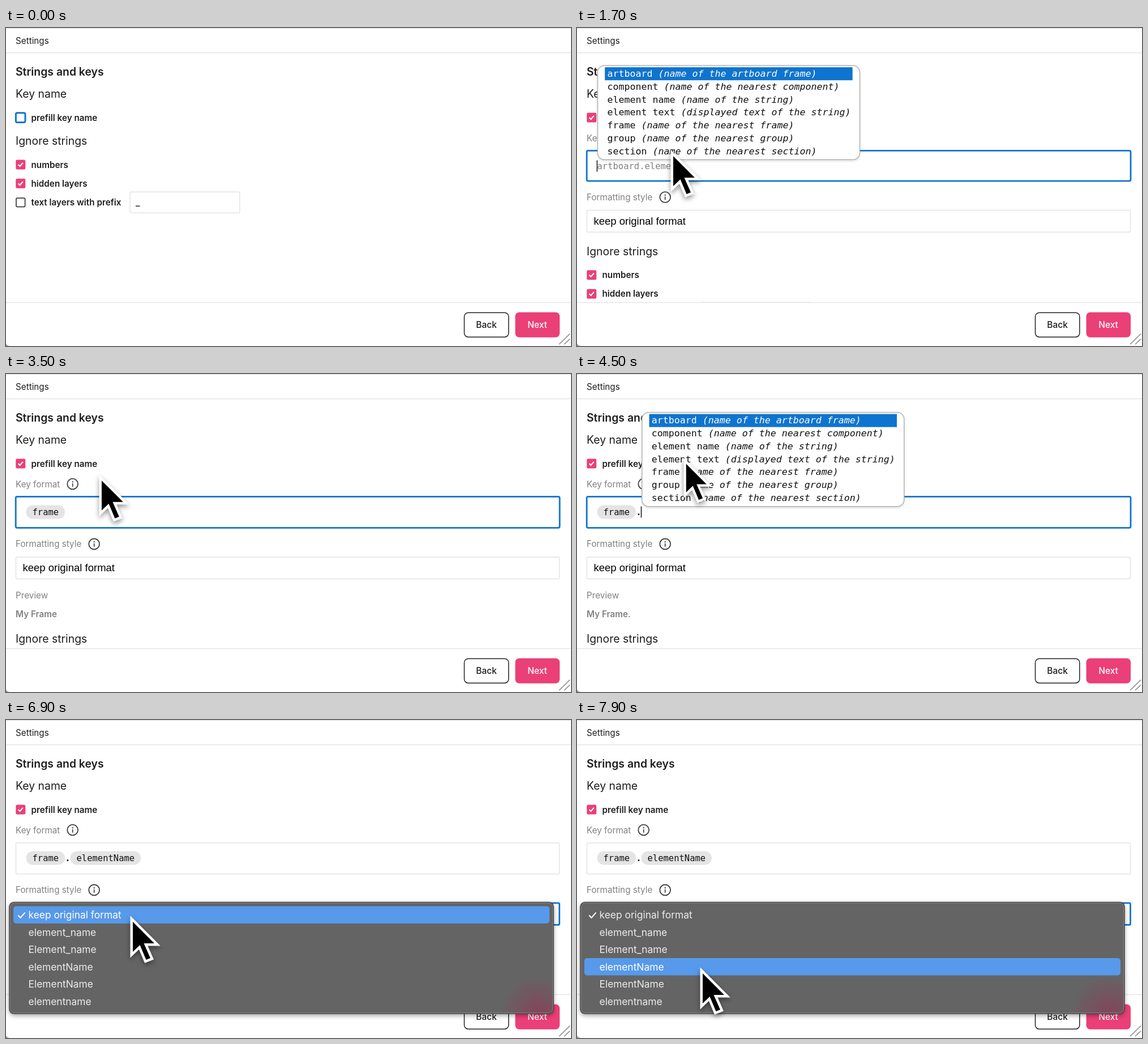
Write an HTML page with a canvas that moves like this. It is 998x561 px and loops after 8000 ms.

```html
<!DOCTYPE html>
<html lang="en">
<head>
<meta charset="utf-8">
<title>Settings</title>
<style>
html, body { margin: 0; width: 100%; height: 100%; overflow: hidden; background: #fff; }
canvas { display: block; width: 998px; height: 561px; }
</style>
</head>
<body>
<canvas id="stage" width="998" height="561"></canvas>
<script>
const ctx = document.getElementById('stage').getContext('2d');
const LOOP = 8000;
const PINK = '#eb3f78', BLUE = '#0f74cf', INK = '#1d1d1d', GREY = '#808080', LINE = '#e4e4e4';
const UI = 'Inter, sans-serif';
const MONO = '"DejaVu Sans Mono", monospace';
const SMALL = `15.25px ${UI}`, BOLD = `600 15.25px ${UI}`, HEAD = `19.4px ${UI}`;
const CODE = `15.5px ${MONO}`;

// Moments at which the state jumps
const AT = { check: 300, arrow: 500, pointer: 1000, focus: 1500, frame: 2900, dot: 4100, element: 5200, menu: 6500 };

const TOKENS = [
  ['artboard', 'name of the artboard frame'],
  ['component', 'name of the nearest component'],
  ['element name', 'name of the string'],
  ['element text', 'displayed text of the string'],
  ['frame', 'name of the nearest frame'],
  ['group', 'name of the nearest group'],
  ['section', 'name of the nearest section']
];
const STYLES = ['keep original format', 'element_name', 'Element_name', 'elementName', 'ElementName', 'elementname'];

// time, x, y, scale
const PATH = [
  [500, 60, 158, 1], [800, 135, 153, 1], [1300, 165, 214, 1], [1700, 165, 214, 1],
  [2450, 162, 182, 0.95], [2700, 162, 182, 0.95], [2950, 164, 176, 0.95], [3600, 164, 176, 1],
  [4350, 188, 147, 0.95], [4600, 188, 147, 0.95], [5050, 185, 135, 0.95], [5300, 185, 135, 1],
  [5850, 185, 135, 1], [6400, 219, 344, 1], [7050, 219, 344, 1], [7700, 217, 435, 1]
];
const POINTER = [[5, 12], [5, 65], [17.5, 53], [28.5, 79], [36, 76], [24.5, 50], [43, 50]];
const ARROW = [[4, 5], [60, 26], [35, 35], [24, 60]];

function label(str, x, y, font = SMALL, color = INK) {
  ctx.font = font;
  ctx.fillStyle = color;
  ctx.fillText(str, x, y);
  return ctx.measureText(str).width;
}

function box(x, y, w, h, r, fill, stroke, width = 1.5) {
  ctx.beginPath();
  ctx.roundRect(x, y, w, h, r);
  if (fill) { ctx.fillStyle = fill; ctx.fill(); }
  if (stroke) { ctx.strokeStyle = stroke; ctx.lineWidth = width; ctx.stroke(); }
}

function line(points, color, width) {
  ctx.beginPath();
  points.forEach(([x, y]) => ctx.lineTo(x, y));
  ctx.strokeStyle = color;
  ctx.lineWidth = width;
  ctx.stroke();
}

function shadow(color, blur, dy) {
  ctx.shadowColor = color;
  ctx.shadowBlur = blur;
  ctx.shadowOffsetY = dy;
}

function tick(x, y, s, color, width) {
  line([[x - 4 * s, y], [x - 1.2 * s, y + 3 * s], [x + 4.2 * s, y - 3.2 * s]], color, width);
}

function checkbox(y, text, on, focus) {
  if (focus && on) box(15.5, y - 10, 20.5, 20, 4, '#fff', BLUE, 1.8);
  if (on) {
    box(17.3, y - 8.5, 17, 17, 2.5, PINK);
    tick(25.7, y, 1, '#fff', 2);
  } else if (focus) {
    box(17.4, y - 8.2, 16.6, 16.6, 2.5, '#fff', BLUE, 3);
  } else {
    box(18, y - 7.5, 15.6, 15.4, 2, '#fff', '#222', 1.5);
  }
  label(text, 44.5, y + 5.5, BOLD);
}

function info(x, y) {
  ctx.beginPath();
  ctx.arc(x, y, 9.4, 0, 7);
  ctx.strokeStyle = '#3d3d3d';
  ctx.lineWidth = 1.8;
  ctx.stroke();
  line([[x, y - 1.2], [x, y + 4.8]], '#3d3d3d', 1.7);
  ctx.fillStyle = '#3d3d3d';
  ctx.fillRect(x - 1, y - 4.8, 2, 2);
}

function chip(text, x) {
  ctx.font = CODE;
  const w = ctx.measureText(text).width + 22;
  box(x, 231.5, w, 24, 12, '#e4e4e4');
  label(text, x + 11, 248.5, CODE, '#111');
  return x + w;
}

function keyField(t) {
  const focus = t >= AT.focus && t < AT.menu;
  const filled = t >= AT.frame;
  const h = filled ? 55 : 53.5;
  label('Key format', 17, 199.5, SMALL, GREY);
  info(117.7, 194);
  if (focus) box(17.2, 216.3, 960.8, h, 2.5, '#fff', BLUE, 2.8);
  else box(17.5, 216.7, 960, h, 2, '#fff', LINE);

  let x = 35.5, since = AT.focus;
  if (!filled) label('artboard.element', 35.5, 248.5, CODE, GREY);
  else { x = chip('frame', x); since = AT.frame; }
  if (t >= AT.dot) { x += label('.', x, 248.5, `bold ${CODE}`, '#111'); since = AT.dot; }
  if (t >= AT.element) { x = chip('elementName', x); since = AT.element; }
  if (focus && (t - since) % 1000 < 500) line([[x, 233.5], [x, 253.5]], '#111', 1.5);
}

function styleField(t) {
  const dy = t >= AT.frame ? 1.4 : 0;
  label('Formatting style', 17, 304 + dy, SMALL, GREY);
  info(155.7, 298.5 + dy);
  const open = t >= AT.menu;
  box(17.5, 321.5 + dy, 960, 38.5, 2, '#fff', open ? BLUE : LINE, open ? 2.8 : 1.5);
  label('keep original format', 29.5, 347 + dy, '18.5px "Liberation Sans", Arial, sans-serif', '#000');
}

function ignoreSection(dy) {
  label('Ignore strings', 17, 206.3 + dy, HEAD);
  checkbox(241 + dy, 'numbers', true);
  checkbox(274.2 + dy, 'hidden layers', true);
  checkbox(307.5 + dy, 'text layers with prefix', false);
  box(219.2, 289.3 + dy, 193.6, 37, 2, '#fff', LINE);
  line([[229, 314.2 + dy], [236.5, 314.2 + dy]], '#222', 1.5);
}

function page(t) {
  const on = t >= AT.check;
  ctx.save();
  ctx.beginPath();
  ctx.rect(0, 44, 998, 440);
  ctx.clip();
  label('Strings and keys', 17, 84.3, `600 19.4px ${UI}`);
  label('Key name', 17, 123.3, HEAD);
  checkbox(158, 'prefill key name', on, t < AT.focus);
  if (on) { keyField(t); styleField(t); }
  if (t >= AT.frame) {
    const value = 'My Frame' + (t >= AT.dot ? '.' : '') + (t >= AT.element ? 'My element' : '');
    label('Preview', 17, 395.5, SMALL, GREY);
    label(value, 17, 429, BOLD, GREY);
  }
  ignoreSection(t >= AT.frame ? 268 : on ? 194.7 : 0);
  ctx.restore();
}

function chrome() {
  ctx.fillStyle = LINE;
  for (const y of [0, 43, 483.7]) ctx.fillRect(0, y, 998, 1.4);
  label('Settings', 17, 27.5);
  box(809.5, 502.2, 78.3, 43, 7, '#fff', '#222', 1.5);
  box(899.5, 501.5, 78.5, 44.3, 7, PINK);
  const font = `500 15.5px ${UI}`;
  ctx.textAlign = 'center';
  label('Back', 848.5, 529, font);
  label('Next', 938.5, 529, font, '#fff');
  ctx.textAlign = 'left';
  line([[977, 558], [996, 539.5]], '#8c8c8c', 1.7);
  line([[986, 558], [996, 548.5]], '#8c8c8c', 1.7);
  ctx.beginPath();
  ctx.moveTo(0, 556);
  ctx.quadraticCurveTo(1, 560, 6, 561);
  ctx.lineTo(0, 561);
  ctx.fillStyle = '#9a9a9a';
  ctx.fill();
}

function popup(x, y) {
  ctx.save();
  shadow('rgba(0,0,0,.16)', 5, 2);
  box(x, y, 463, 166, 12, '#fff');
  ctx.restore();
  box(x, y, 463, 166, 12, null, '#b4b4b4', 1.5);
  ctx.fillStyle = BLUE;
  ctx.fillRect(x + 12.7, y + 2.9, 437.5, 23);
  TOKENS.forEach(([name, note], i) => {
    const color = i ? '#111' : '#fff', ty = y + 19.7 + i * 22.75;
    const w = label(name + ' ', x + 17, ty, `16.63px ${MONO}`, color);
    label(`(${note})`, x + 17 + w, ty, `italic 16.63px ${MONO}`, color);
  });
}

function menu(tipY) {
  ctx.save();
  shadow('rgba(0,0,0,.4)', 9, 3);
  box(6, 321.5, 961, 196.5, 8, '#646464');
  ctx.restore();
  ctx.save();
  ctx.beginPath();
  ctx.roundRect(6, 321.5, 961, 196.5, 8);
  ctx.clip();
  const glow = ctx.createRadialGradient(940, 518, 4, 940, 518, 66);
  glow.addColorStop(0, 'rgba(140,60,88,.75)');
  glow.addColorStop(1, 'rgba(140,60,88,0)');
  ctx.fillStyle = glow;
  ctx.fillRect(860, 440, 110, 80);
  ctx.restore();
  box(6, 321.5, 961, 196.5, 8, null, '#474747', 1.6);
  box(7.3, 322.8, 958.4, 193.9, 7, null, '#858585', 1);

  const row = Math.max(0, Math.min(5, Math.floor((tipY - 328.5) / 30.5)));
  box(13, 328.5 + row * 30.5, 947, 30.5, 5, '#5799ea');
  STYLES.forEach((s, i) => label(s, 39.5, 350 + i * 30.5, `17.4px ${UI}`, i === row ? '#fff' : '#ececec'));
  tick(27.3, 344.5, 1.5, '#fff', 2);
}

function pose(t) {
  const i = PATH.findIndex(k => k[0] > t);
  if (i < 0) return PATH[PATH.length - 1].slice(1);
  const a = PATH[i - 1] || PATH[0], b = PATH[i];
  const u = a === b ? 0 : (t - a[0]) / (b[0] - a[0]);
  const e = u * u * (3 - 2 * u);
  return [1, 2, 3].map(n => a[n] + (b[n] - a[n]) * e);
}

function cursor(t, [x, y, s]) {
  const big = t >= AT.pointer;
  ctx.save();
  ctx.translate(x, y);
  ctx.scale(s, s);
  ctx.beginPath();
  (big ? POINTER : ARROW).forEach(p => ctx.lineTo(...p));
  ctx.closePath();
  ctx.save();
  shadow('rgba(0,0,0,.42)', 8, 4);
  ctx.strokeStyle = '#fff';
  ctx.lineJoin = 'miter';
  ctx.lineWidth = big ? 9 : 5;
  ctx.stroke();
  ctx.restore();
  ctx.fillStyle = '#000';
  ctx.fill();
  ctx.restore();
}

function draw(t) {
  ctx.fillStyle = '#fff';
  ctx.fillRect(0, 0, 998, 561);
  page(t);
  chrome();
  const p = pose(t);
  if (t >= AT.focus && t < AT.frame) popup(36.5, 66.3);
  if (t >= AT.dot && t < AT.element) popup(114.8, 67.7);
  if (t >= AT.menu) menu(p[1]);
  if (t >= AT.arrow) cursor(t, p);
}

const start = performance.now();
function loop() {
  draw((performance.now() - start) % LOOP);
  requestAnimationFrame(loop);
}
loop();
</script>
</body>
</html>
```
